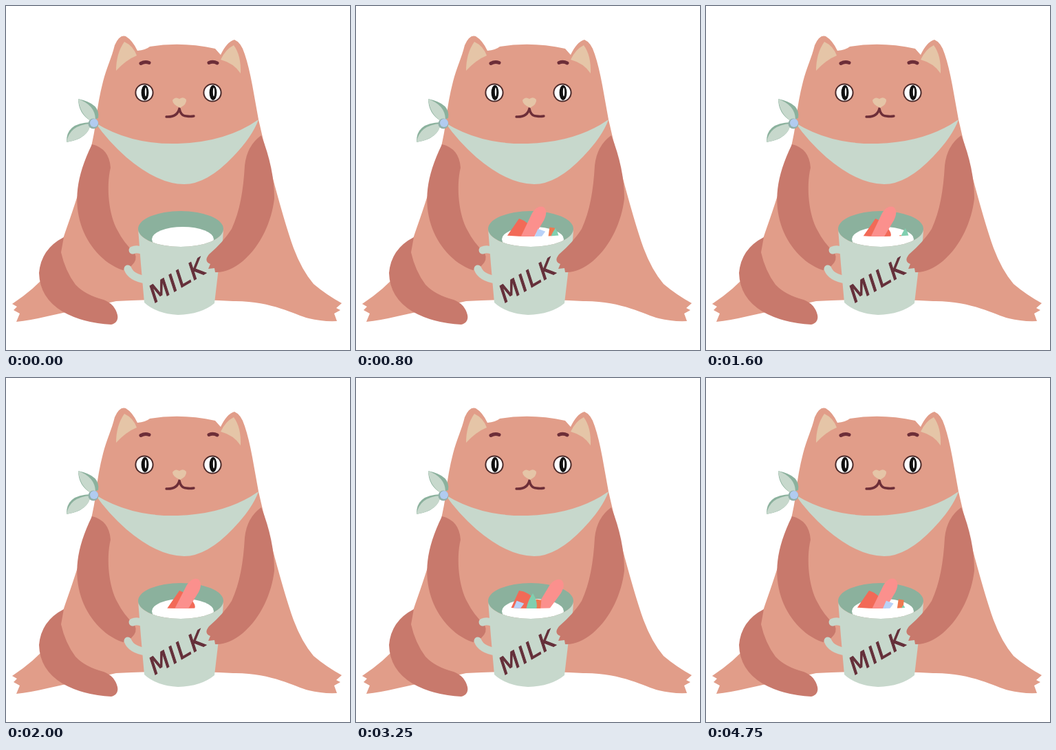
Recreate the animation shown at these times as an HTML page. Size 500 px wide and 500 px high, loop 5 s.

```html
<!DOCTYPE html>
<html lang="en">
<head>
<meta charset="utf-8">
<title>Cat with milk</title>
<style>
  html, body { margin: 0; width: 100%; height: 100%; overflow: hidden; background: #fff; }
  svg { display: block; width: 100%; height: 100%; }
  .body { fill: #e19d89; }
  .limb { fill: #c8796c; }
  .mint { fill: #c7d8cc; }
  .shade { fill: #8bb19d; }
  .sand { fill: #e5c5a7; }
  .line { fill: none; stroke: #6d2e38; stroke-linecap: round; stroke-linejoin: round; }
  .handle { fill: none; stroke: #c7d8cc; stroke-width: 11; stroke-linecap: round; }
  text { font: 35px "DejaVu Sans", sans-serif; letter-spacing: 2px; fill: #65303a; stroke: #65303a; }
</style>
</head>
<body>
<svg viewBox="0 0 500 500">
  <defs>
    <clipPath id="rim"><ellipse cx="254" cy="324" rx="62" ry="26"/></clipPath>
    <clipPath id="surface"><path d="M0 0H500V333H302Q257 337 212 333H0Z"/></clipPath>
    <g id="eye">
      <circle r="12.6" fill="#fff" stroke="#4b2a2a" stroke-width="2"/>
      <ellipse cx="1" rx="5.4" ry="11" fill="#111"/>
      <ellipse cx="2" cy="-1" rx="1.2" ry="6.5" fill="#fff"/>
    </g>
  </defs>

  <path class="body" d="M131 165Q134 137 141 110C146 90 154 74 158 57Q165 41 174 44Q184 50 191 65Q203 64 209 59Q255 51 304 62L312 71Q321 52 332 49Q342 53 347 70Q353 88 358 115L367 165C381 226 400 300 418 352Q430 384 447 404Q466 420 488 432L480 439L486 442L477 447L481 458Q460 459 440 454C420 449 385 428 330 429Q250 424 160 429L60 451Q35 457 15 459L20 447L11 442L16 437L9 433Q42 411 61 388Q78 366 83 338C100 289 124 221 131 165Z"/>
  <path class="sand" d="M160 94Q160 69 172 52Q185 58 190 72Q175 78 160 94Z"/>
  <path class="sand" d="M341 98Q331 83 312 78Q319 63 331 57Q342 72 341 98Z"/>
  <path class="limb" d="M84 336Q51 353 48 388Q49 424 82 444Q112 461 153 463Q164 460 162 449Q158 433 142 427Q115 420 101 405Q86 385 80 358Z"/>

  <g class="line">
    <path stroke-width="5" d="M196 83.5Q202 80 208 82.5M295 82.5Q301 80 307 83"/>
    <path stroke-width="3.4" d="M233 161Q249 162 252 149Q254 160 262 160Q268 161 273 160"/>
  </g>
  <use href="#eye" x="201" y="126"/>
  <use href="#eye" x="300" y="126"/>
  <path class="sand" d="M252 135Q258 131 262 136Q263 143 253 148Q242 143 242 137Q246 131 252 135Z"/>

  <path class="mint" d="M130 170Q182 202 250 200Q320 198 367 165Q358 190 330 219Q292 259 259 259Q221 259 175 220Q148 196 130 170Z"/>
  <path class="shade" d="M105 135Q138 142 134 163L123 167Q105 156 105 135ZM88 198Q87 170 123 169Q121 193 88 198Z"/>
  <path class="mint" d="M105 135Q129 144 130 164L123 167Q107 156 105 135ZM88 198Q92 173 123 171Q121 192 88 198Z"/>
  <circle cx="127" cy="171" r="7.5" fill="#91b1aa"/>
  <circle cx="128" cy="170" r="6" fill="#b1cbf0"/>

  <path class="limb" d="M125 201Q150 207 152 235C145 264 150 305 162 326Q171 344 187 359Q192 369 182 378L170 384C140 374 118 346 109 318C99 285 101 250 125 201Z"/>
  <path class="handle" d="M200 356Q190 352 184 355M177 382Q182 395 204 398"/>

  <ellipse class="shade" cx="254" cy="324" rx="62" ry="26"/>
  <ellipse cx="257" cy="339" rx="45" ry="18" fill="#fff" clip-path="url(#rim)"/>
  <g id="pieces" clip-path="url(#surface)"></g>
  <path class="mint" d="M192 324A62 26 0 0 0 316 324Q315 352 309 381L303 432Q284 448 250 449Q218 447 201 431L196 375Z"/>
  <text transform="matrix(.86 -.5 .31 .95 214 433)">MILK</text>
  <path class="limb" d="M371 188Q350 203 347 232C345 268 340 298 328 324Q316 343 295 361Q287 371 297 375L294 382L303 381L304 387Q323 388 344 371C371 348 386 313 390 280Q390 236 371 188Z"/>
</svg>
<script>
const FRAME = 50, LOOP = 5000, REST = 4500, LAST = 4750;
const ENTER = 400, SPLASH = 550;
const ORBIT = 4100, PEAK = 3250;
const FALL = { x: -12, y: 95 };

// start: pose at one step after entering; float: pose in the milk,
// where swing is the sideways drift and depth is how far it is pulled under.
const pieces = [
  { fill: '#f26a57', shape: 'M0 0Q14 4 22 20Q24 26 20 28Q0 34 -20 29Z',
    start: { x: 324, y: 159, turn: 0 },
    float: (swing, depth) => ({ x: 237 + 16 * depth, y: 309, turn: -10 * Math.max(0, swing) }) },
  { fill: '#fb908d', shape: 'M-9 -18Q-7 -32 2 -33Q11 -31 11 -16L8 17Q5 31 -3 33Q-9 31 -9 17Z',
    start: { x: 284, y: 162, turn: 23 },
    float: swing => ({ x: 267 + 13 * swing, y: 321, turn: 28 + 3 * swing }) },
  { fill: '#b9d2f8', shape: 'M-4 -7L7 -4L1 6L-8 5Z',
    start: { x: 315, y: 184, turn: 0 },
    float: (swing, depth) => ({ x: 254 - 17 * swing, y: 331 + 20 * depth, turn: 5 }) },
  { fill: '#ee7950', shape: 'M-4 -10L4 -10L5 10L-4 10Z',
    start: { x: 321, y: 150, turn: 0 },
    float: (swing, depth) => ({ x: 275 - 11 * swing, y: 332 + 20 * depth, turn: 8 }) },
  { fill: '#80cfaf', shape: 'M2 -19Q11 -5 6 9Q1 18 -9 15Q-8 -5 2 -19Z',
    start: { x: 330, y: 148, turn: 5 },
    float: swing => ({ x: 273 - 18 * swing, y: 332 + 30 * (1 - swing * swing), turn: 0 }) }
];

const group = document.getElementById('pieces');
for (const piece of pieces) {
  piece.node = document.createElementNS('http://www.w3.org/2000/svg', 'path');
  piece.node.setAttribute('d', piece.shape);
  piece.node.setAttribute('fill', piece.fill);
  group.append(piece.node);
}

const mix = (a, b, k) => a + (b - a) * k;

function poseAt({ start, float }, t) {
  const angle = 2 * Math.PI * (t - PEAK) / ORBIT;
  const afloat = float(Math.cos(angle), Math.max(0, -Math.sin(angle)));
  const begin = ENTER + FRAME;
  if (t < begin) return { x: start.x - FALL.x, y: start.y - FALL.y, turn: start.turn };
  const k = Math.min(1, (t - begin) / (SPLASH - begin));
  return {
    x: mix(start.x, afloat.x, k),
    y: mix(start.y, afloat.y, k),
    turn: mix(start.turn, afloat.turn, k)
  };
}

function draw() {
  let t = Math.floor(performance.now() % LOOP / FRAME) * FRAME;
  if (t > REST) t = t < LAST ? REST : LAST;
  group.style.display = t < ENTER ? 'none' : '';
  for (const piece of pieces) {
    const { x, y, turn } = poseAt(piece, t);
    piece.node.setAttribute('transform', `translate(${x} ${y}) rotate(${turn})`);
  }
  requestAnimationFrame(draw);
}
draw();
</script>
</body>
</html>
```
